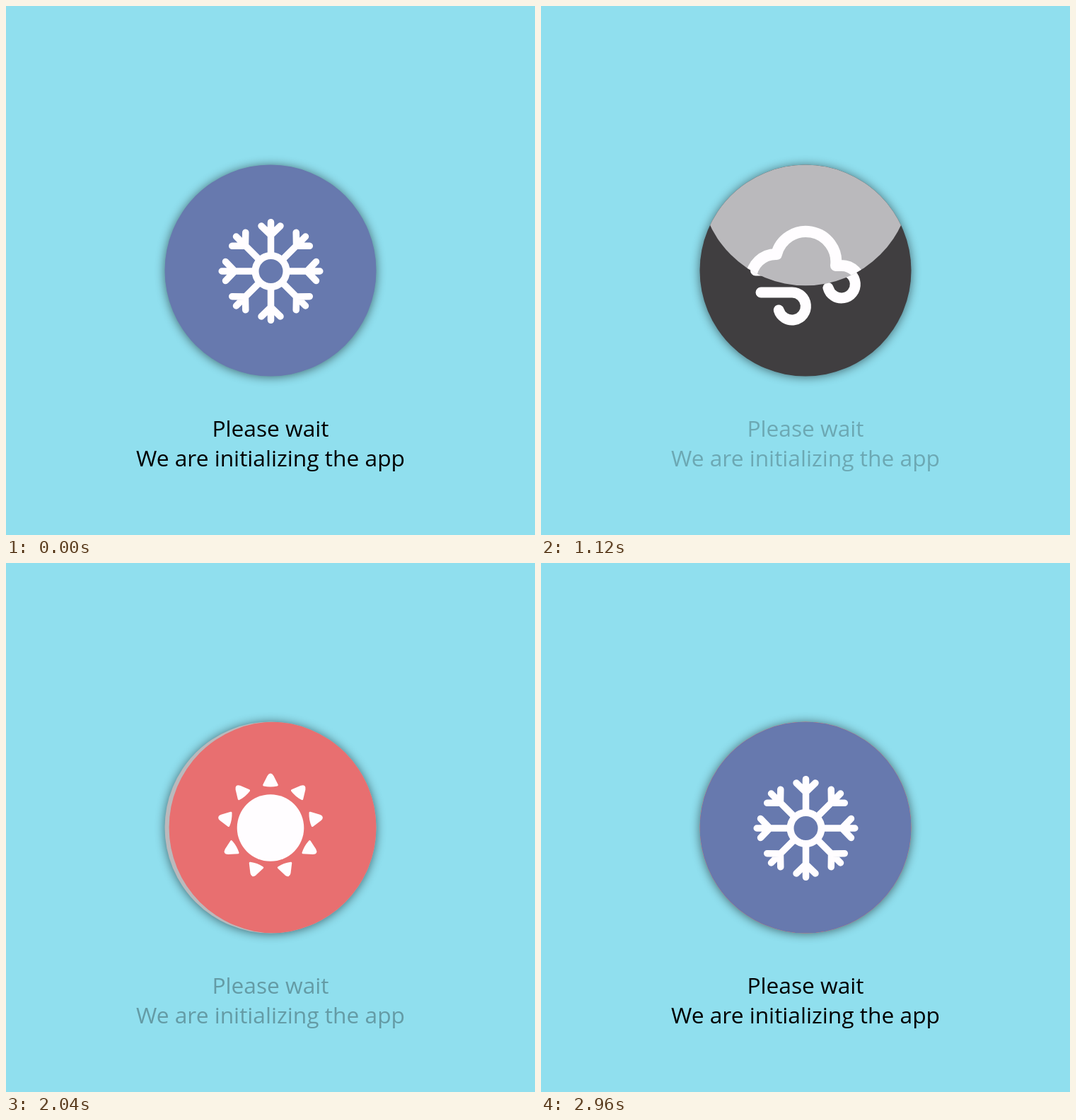
An HTML page that plays this animation: 748x748 px, repeating every 3040 ms.

```html
<!DOCTYPE html>
<html lang="en">
<head>
<meta charset="utf-8">
<title>Loading</title>
<style>
  html, body { margin: 0; width: 100%; height: 100%; overflow: hidden; background: #90dfee; }
  svg { display: block; width: 100vw; height: 100vh; }
  text { font: 400 31.7px "Open Sans", sans-serif; text-anchor: middle; }
  .icon { fill: none; stroke: #fffdff; stroke-linecap: round; stroke-linejoin: round; }
  .solid { fill: #fffdff; }
</style>
</head>
<body>
<svg viewBox="0 0 748 748">
  <defs>
    <filter id="soft" x="-20%" y="-20%" width="140%" height="140%">
      <feGaussianBlur stdDeviation="7"/>
    </filter>
    <clipPath id="badge"><circle cx="374" cy="374" r="149.5"/></clipPath>
    <clipPath id="reveal"><circle id="wipe" cx="374" cy="374" r="149.5"/></clipPath>

    <g id="snow">
      <rect width="748" height="748" fill="#6779ae"/>
      <g id="flake" class="icon" stroke-width="9.5" transform="translate(374.5 375)">
        <circle r="22" stroke-width="10"/>
      </g>
    </g>
    <g id="wind">
      <rect width="748" height="748" fill="#403e40"/>
      <path class="icon" stroke-width="15" d="M319 342.5H386A19.5 19.5 0 1 0 367.3 317.5
        M303.5 374H425A19.5 19.5 0 1 1 406 398.5
        M311 405H355A19.5 19.5 0 1 1 336.2 430"/>
    </g>
    <g id="cloud">
      <rect width="748" height="748" fill="#bab9bc"/>
      <path class="icon" stroke-width="16"
        d="M331 421A35 35 0 0 1 333 351A42.85 42.85 0 0 1 417 367H425A27 27 0 0 1 425 421Z"/>
    </g>
    <g id="sun">
      <rect width="748" height="748" fill="#e86f70"/>
      <circle class="solid" cx="374" cy="374.5" r="47.3"/>
      <g id="rays" class="icon solid" stroke-width="3" transform="translate(374 372.5)"/>
    </g>
  </defs>

  <circle cx="374" cy="375" r="150" opacity=".5" filter="url(#soft)"/>
  <g clip-path="url(#badge)">
    <use id="below"/>
    <g clip-path="url(#reveal)"><use id="above"/></g>
  </g>
  <g id="message">
    <text x="374" y="609">Please wait</text>
    <text x="374" y="650.5">We are initializing the app</text>
  </g>
</svg>
<script>
  const LOOP = 3040, STEP = 40, LAST = 2960, SLIDE = 600, SIZE = 299;
  const scenes = ["snow", "wind", "cloud", "sun"];
  const slides = [
    { start: 54, dx: -1, dy: 0 },
    { start: 805, dx: 0, dy: -1 },
    { start: 1543, dx: 1, dy: 0 },
    { start: 2312, dx: 0, dy: 1 }
  ];
  const $ = id => document.getElementById(id);
  const clamp = x => Math.min(1, Math.max(0, x));
  const ease = x => x < 0.5 ? 4 * x ** 3 : 1 - 4 * (1 - x) ** 3;

  function addSpokes(parent, count, d) {
    for (let i = 0; i < count; i++) {
      const path = document.createElementNS("http://www.w3.org/2000/svg", "path");
      path.setAttribute("d", d);
      path.setAttribute("transform", `rotate(${i * 360 / count})`);
      parent.append(path);
    }
  }
  addSpokes($("flake"), 8, "M0-26V-69.3M-13.5-64L0-51L13.5-64");
  addSpokes($("rays"), 9, "M0-73.5Q1.5-73.5 3-71L9.3-58.5Q0-56.5-9.3-58.5L-3-71Q-1.5-73.5 0-73.5Z");

  function draw(time) {
    const t = Math.min(LAST, Math.floor(time % LOOP / STEP) * STEP);
    const index = Math.max(0, slides.findLastIndex(s => t >= s.start));
    const { start, dx, dy } = slides[index];
    const left = SIZE * (1 - ease(clamp((t - start) / SLIDE)));

    $("below").setAttribute("href", "#" + scenes[index]);
    $("above").setAttribute("href", "#" + scenes[(index + 1) % scenes.length]);
    $("wipe").setAttribute("cx", 374 + dx * left);
    $("wipe").setAttribute("cy", 374 + dy * left);

    // The message fades out, rests, then fades back in.
    const fade = t < 1550 ? 1 - (t - 30) / 1440 : (t - 1640) / 1320;
    $("message").setAttribute("opacity", clamp(fade));
  }

  let origin;
  function tick(now) {
    origin ??= now;
    draw(now - origin);
    requestAnimationFrame(tick);
  }
  draw(0);
  requestAnimationFrame(tick);
</script>
</body>
</html>
```
